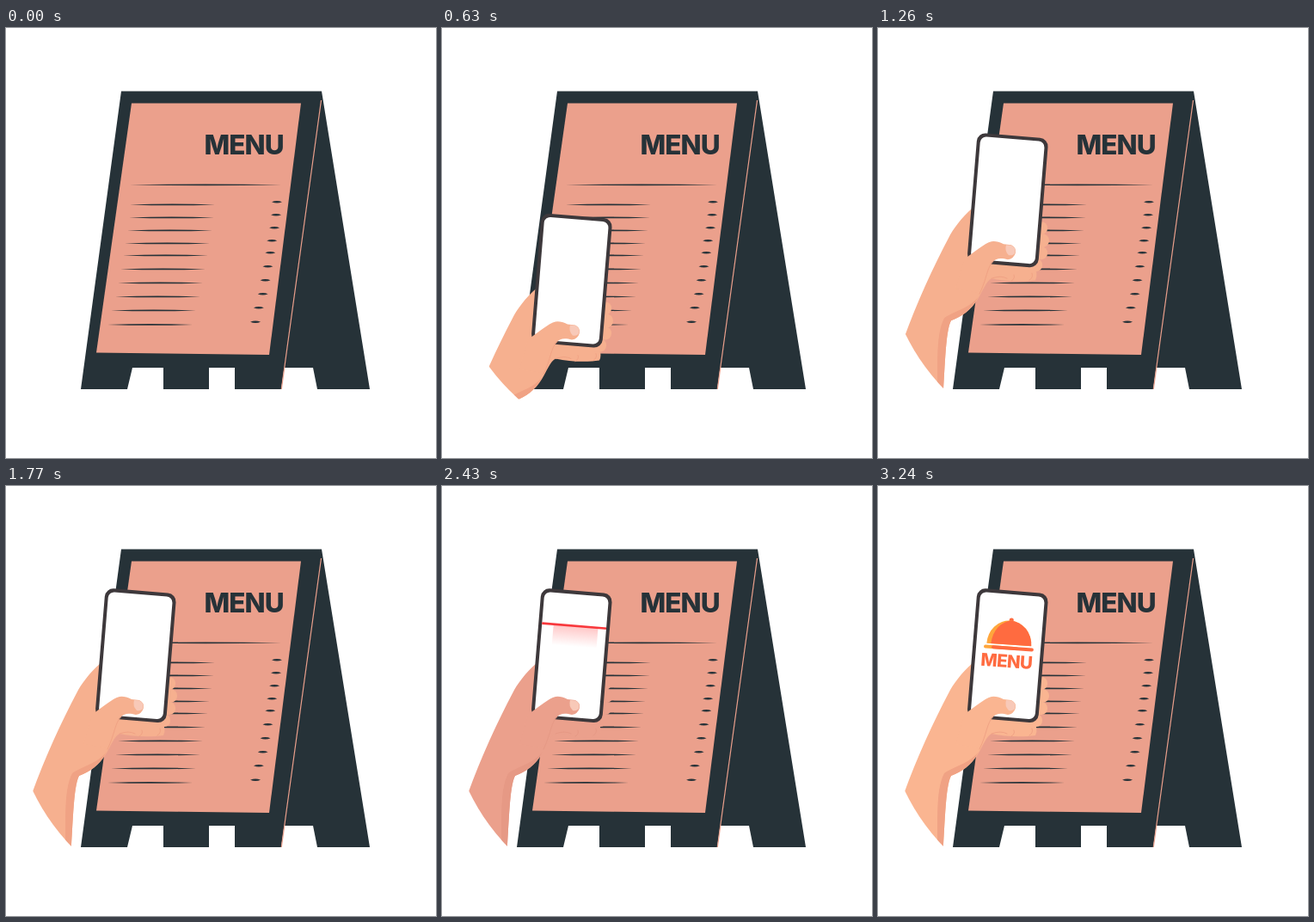
An HTML page for the animation above (3930 ms loop, 500 by 500 pixels).

```html
<!DOCTYPE html>
<html lang="en">
<head>
<meta charset="utf-8">
<title>Menu board</title>
<style>
  html, body { margin: 0; width: 100%; height: 100%; overflow: hidden; background: #fff; }
  svg { display: block; width: 100vw; height: 100vh; }
  text { font: 800 31.5px Inter, sans-serif; letter-spacing: -.03em; }
  .dark { fill: #263238; }
  .paper { fill: #eba08c; }
  .skin { fill: var(--skin); }
  .shade { fill: var(--shade); }
  .crease { fill: none; stroke: var(--shade); stroke-width: 1; stroke-linecap: round; }
</style>
</head>
<body>
<svg viewBox="0 0 500 500">
  <defs>
    <clipPath id="stage"><circle cx="250" cy="250" r="242.5"/></clipPath>
    <clipPath id="screen"><rect x="-37.5" y="-71.5" width="75" height="143" rx="7"/></clipPath>
    <linearGradient id="glow" x2="0" y2="1">
      <stop stop-color="#ff4040" stop-opacity=".3"/>
      <stop offset="1" stop-color="#ff4040" stop-opacity="0"/>
    </linearGradient>
  </defs>

  <g id="board">
    <path class="dark" d="M134 73.500H367L423 420H362L357 395H323.500L320 420H266V395H236V420H183V395H147L141 420H87Z"/>
    <path d="M366.500 84L320.300 420" stroke="#eba08c" stroke-width="1.200"/>
    <path class="paper" d="M146 87.500H343L306 380L105 377.500Z"/>
    <text class="dark" x="230.500" y="147">MENU</text>
    <path id="rows" class="dark"/>
  </g>

  <g clip-path="url(#stage)">
    <g id="hand">
      <g class="skin">
        <path d="M110 206C97 217 87 231 82 241C65 273 45 316 30 358L20 440H74.500C78 395 78 350 85 337C98 332 108 325 116 312C122 302 126 291 132 288C150 292 170 292 183 290Q187 283 180 270L120 200Z"/>
        <rect x="176" y="222" width="21" height="15" rx="7"/>
        <rect x="176" y="236" width="23" height="16" rx="8"/>
        <rect x="174" y="251" width="23" height="15" rx="7"/>
        <rect x="170" y="265" width="21" height="15" rx="7"/>
      </g>
      <path class="shade" d="M117 309C108 325 98 332 85 337C78 350 78 395 74.500 440H69C70 395 66 355 77 334C88 326 106 323 117 309Z"/>
      <path class="crease" d="M132 288Q143 284 150 288M155 291Q160 288 158 284M176 290Q181 287 179 282"/>
      <g transform="translate(150.800 197.200) rotate(4.700)">
        <rect x="-41.500" y="-75.500" width="83" height="151" rx="10" fill="#3d383b"/>
        <rect x="-37.500" y="-71.500" width="75" height="143" rx="7" fill="#fff"/>
        <g clip-path="url(#screen)">
          <g id="scan">
            <rect x="-24" width="52" height="24" fill="url(#glow)"/>
            <rect x="-40" y="-1.300" width="80" height="2.600" fill="#f8383c"/>
          </g>
        </g>
      </g>
      <g id="dish" transform="translate(152 188) rotate(4)" fill="#ff6b40">
        <circle cx="1" cy="-32" r="2.600"/>
        <path d="M-26-3.500A26 28 0 0 1 26-3.500Z" fill="#ffa63c"/>
        <path d="M-21-3.500C-20-19-11-29 0-31.500A26 28 0 0 1 26-3.500Z"/>
        <rect x="-29" y="-1.500" width="40" height="4" rx="2" fill="#ffa63c"/>
        <rect x="-20" y="-1.500" width="49" height="4" rx="2"/>
        <text x="-31.500" y="23" style="font-size:20.500px">MENU</text>
      </g>
      <path class="skin" d="M100 266C112 257 124 247 132 245Q138 244 146 248L155 249Q161 252 160 258Q158 265 151 266C143 264 137 264 132 270C127 277 123 290 117 305L90 300Z"/>
      <path d="M149 249L155 249.500Q160.500 252 159.500 258Q157 262 152 261Q147 256 149 249Z" fill="#f8c9b8"/>
      <path class="crease" d="M134 268C126 276 127 288 118 306"/>
    </g>
  </g>
</svg>
<script>
const LOOP = 3930;
const $ = id => document.getElementById(id);
const clamp = v => Math.min(1, Math.max(0, v));
const ramp = (t, from, to) => clamp((t - from) / (to - from));

// Hairline that swells in the middle
const spindle = (x, y, w, bulge) =>
  `M${x} ${y}q${w / 2} ${-bulge} ${w} 0q${-w / 2} ${bulge} ${-w} 0`;

const rowY = [205, 220, 235, 250, 264, 280, 296, 312, 328, 344.5];
const rowX = [144, 143, 141, 138, 136, 133, 130, 127, 122, 118];
$('rows').setAttribute('d', spindle(144, 182.3, 176, 1.8) + rowY.map((y, i) =>
  spindle(rowX[i], y + .4, 99, 1.8) +
  spindle(309 - (144 - rowX[i]) * .96, y - 2.7, 12, 2.4)).join(''));

function draw(t) {
  const rise = 410 * (1 - clamp(t / 1500)) ** 2.65;
  $('hand').setAttribute('transform', `translate(0 ${rise})`);

  const sweep = -9 + 30 * Math.cos(Math.PI * (t - 2100) / 400);
  $('scan').setAttribute('transform', `translate(0 ${sweep})`);
  $('scan').setAttribute('opacity', ramp(t, 2100, 2190) * (1 - ramp(t, 2670, 2790)));
  $('dish').setAttribute('opacity', ramp(t, 2760, 3210));

  const [skin, shade] = t < 2100 ? ['#f6b08f', '#f0a284']
    : t < 2790 ? ['#eba08c', '#e69985']
    : ['#fab591', '#f0a284'];
  const { style } = $('hand');
  style.setProperty('--skin', skin);
  style.setProperty('--shade', shade);
}

const start = performance.now();
function tick() {
  draw((performance.now() - start) % LOOP);
  requestAnimationFrame(tick);
}
tick();
</script>
</body>
</html>
```
